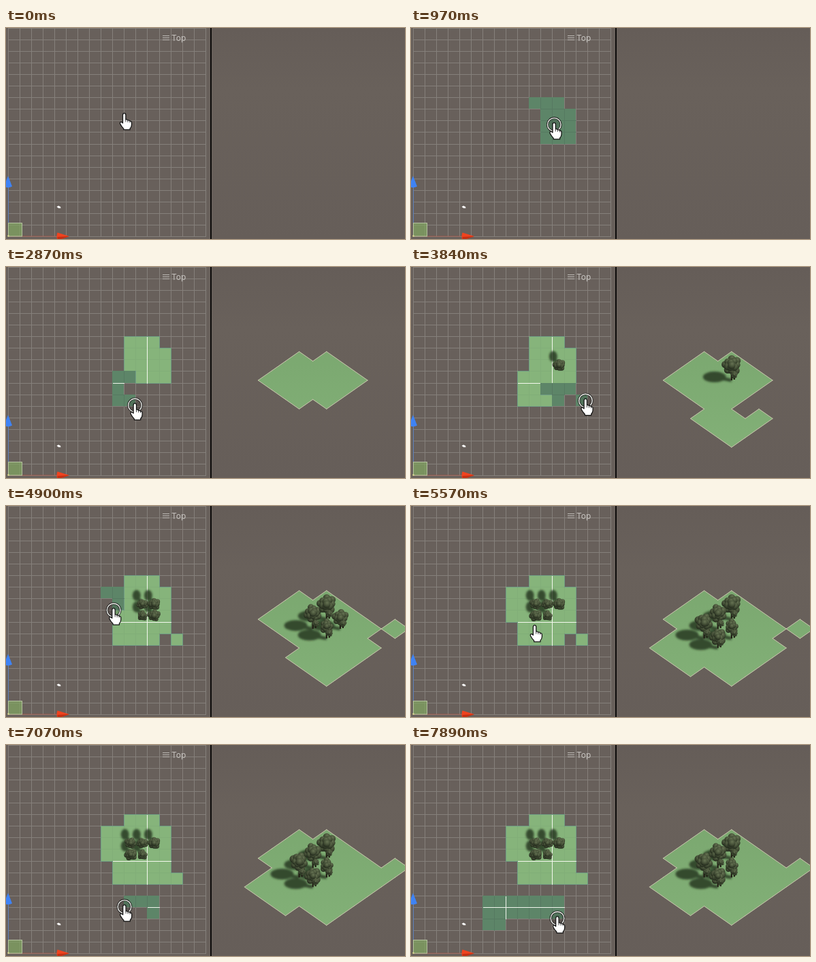
An HTML page for the animation above (8 s loop, 586 by 311 pixels).

```html
<!DOCTYPE html>
<html lang="en">
<head>
<meta charset="utf-8">
<title>Tile painting</title>
<style>
html, body { margin: 0; width: 100%; height: 100%; overflow: hidden; background: #68605b; }
svg { display: block; }
text { font: 12px Inter, Roboto, sans-serif; fill: #c6c2be; }
</style>
</head>
<body>
<svg width="586" height="311" viewBox="0 0 586 311">
  <defs>
    <radialGradient id="leaf" cx=".58" cy=".3" r=".72">
      <stop offset="0" stop-color="#667353"/>
      <stop offset=".5" stop-color="#465138"/>
      <stop offset="1" stop-color="#1f2619"/>
    </radialGradient>
    <linearGradient id="sky" x2="0" y2="1">
      <stop offset="0" stop-color="#655d58"/>
      <stop offset=".3" stop-color="#69615b"/>
      <stop offset="1" stop-color="#665e59"/>
    </linearGradient>
    <linearGradient id="lawn" gradientUnits="userSpaceOnUse" x1="0" y1="120" x2="0" y2="268">
      <stop offset="0" stop-color="#7ba870"/>
      <stop offset="1" stop-color="#82b077"/>
    </linearGradient>
    <filter id="soft" x="-30%" y="-30%" width="160%" height="160%"><feGaussianBlur stdDeviation="1.6"/></filter>
    <clipPath id="right"><path d="M302 0H586V311H302Z"/></clipPath>
  </defs>
  <rect width="586" height="311" fill="#68605b"/>
  <rect x="302" width="284" height="311" fill="url(#sky)"/>
  <path id="grid" stroke="#85807b" fill="none" shape-rendering="crispEdges"/>
  <g id="plan"></g>
  <g id="iso" clip-path="url(#right)"></g>
  <path d="M3.500 235V307" stroke="#4a86e8" opacity=".6"/>
  <path d="M3 307H76" stroke="#c2503c" opacity=".6"/>
  <rect x="3.500" y="287.500" width="20" height="19.500" fill="#81a562" fill-opacity=".72" stroke="#b5c4a0"/>
  <path d="M3 218L9 233.500Q3 237 -3 233.500Z" fill="#3f83f5"/>
  <path d="M75.500 301.500L93 307L75.500 313Q73.500 307 75.500 301.500Z" fill="#f0431f"/>
  <path d="M75.500 308L93 307L75.500 313Z" fill="#c23014"/>
  <path d="M74.500 263.500L77 262L80 263.500L80.500 265.500L77 265.500Z" fill="#fff"/>
  <circle cx="3.500" cy="306.500" r="1.300" fill="#d8d890"/>
  <path d="M230 11.500H240M230 14.500H240M230 17.500H240" stroke="#bdb9b5"/>
  <text x="243" y="19">Top</text>
  <rect x="300" width="2" height="311" fill="#0c0b0a"/>
  <g id="hand">
    <g id="ring">
      <circle r="9.800" fill="#1d1d1d" fill-opacity=".18" stroke="#1a1a1a" stroke-width="3"/>
      <circle r="9.800" fill="none" stroke="#f2f2ee" stroke-width="1.400"/>
    </g>
    <g transform="translate(0 -1.300) scale(1.040)">
      <path d="M-2.200 1Q-2.200 -1.500 0 -1.500Q2 -1.500 2 1V7.500Q3.400 6.800 4.900 8.600Q6.600 7.900 7.800 9.700Q10.300 9.400 10.300 12.300V15Q10 18.500 8 20V22H-1V20.500Q-4 17.500 -6 13.500Q-6.500 10.800 -4.200 11Q-3 11.600 -2.200 12.600Z"
        fill="#fff" stroke="#111" stroke-width="1.200" stroke-linejoin="round"/>
      <path d="M2 7.500V11M4.900 8.600V11.500M7.800 9.700V12" stroke="#222" stroke-width=".8"/>
    </g>
  </g>
</svg>
<script>
const LOOP = 8000, TICK = 135.9, RELEASE = 110, PITCH = 17.064, CHUNK = 4;
const el = id => document.getElementById(id);
const mix = (a, b, f) => a.map((v, i) => v + (b[i] - v) * f);
const easeOut = f => 1 - (1 - f) ** 3;
const rand = (...seed) => {
  const v = Math.sin(seed.reduce((sum, s) => sum * 3.7 + s * 12.9, 1)) * 43758.5;
  return v - Math.floor(v);
};

// Cell coordinates to pixels, in the plan and in the isometric view
const planAt = (c, r) => [3.2 + c * PITCH, 0.4 + r * PITCH];
const snapAt = (c, r) => planAt(c, r).map(Math.floor);
const lineAt = (c, r) => snapAt(c, r).map(v => v + .5);
const isoAt = (c, r) => [370.3 + 20.1 * (c + r - 16), 167 + 14.1 * (r - c + 4)];

// Each stroke walks from cell to cell at a constant pace
const strokes = [
  { from: 270, to: 1138, start: [10.35, 6.32], route: "E E S E S S W W N N SE W W N" },
  { from: 2330, to: 2990, start: [10.02, 9.92], route: "W S S E E NW" },
  { from: 3420, to: 3810, start: [11.84, 10.52], route: "SE N E SE" },
  { from: 4640, to: 5290, start: [8.13, 7.97], route: "E S W S E" },
  { from: 5840, to: 5840, start: [13.5, 11.5], route: "" },
  { from: 6690, to: 7890, start: [12.41, 14.95], route: "N W W W W W W S S E N E E E E E" }
];
const has = (word, ch) => word.includes(ch) ? 1 : 0;
const cells = new Map();
for (const s of strokes) {
  s.nodes = [s.start];
  for (const w of s.route.split(" ").filter(Boolean)) {
    const [c, r] = s.nodes.at(-1);
    s.nodes.push([c + has(w, "E") - has(w, "W"), r + has(w, "S") - has(w, "N")]);
  }
  s.pace = (s.to - s.from) / (s.nodes.length - 1) || 1;
  s.nodes.forEach((node, i) => {
    const [c, r] = node.map(Math.floor), key = c + "," + r;
    if (!cells.has(key)) cells.set(key, { c, r, on: s.from + i * s.pace, set: s.to + RELEASE });
  });
}

function pointer(t) {
  const i = strokes.findLastIndex(s => s.from <= t), s = strokes[i], next = strokes[i + 1];
  const end = s ? s.nodes.at(-1) : [10, 7.5], left = s ? s.to + RELEASE : 0;
  if (s && t < s.to) {
    const n = (t - s.from) / s.pace, k = Math.floor(n);
    return mix(s.nodes[k], s.nodes[k + 1], n - k);
  }
  if (t < left || !next) return end;
  return mix(end, next.start, easeOut((t - left) / (next.from - left)));
}

// Cells that carry a tree after each release
const groves = ["", "12,8", "11,8 12,8 11,9 12,9", "12,8 11,8 10,8 11,9 10,9"];
const treesAt = t => {
  const n = strokes.filter(s => s.to + RELEASE <= t).length;
  const list = n ? groves[Math.min(n, groves.length) - 1] : "";
  return list.split(" ").filter(Boolean).map(k => k.split(",").map(Number));
};

const num = p => p.map(v => v.toFixed(1)).join(" ");
const path = (d, attrs) => d ? `<path d="${d}" ${attrs}/>` : "";

// A crown is a spiral of leaf balls, outermost first
function crown([x, y], r, squash, seed) {
  let out = "";
  for (let i = 13; i >= 0; i--) {
    const a = i * 2.4 + seed * 6.3, d = r * .72 * Math.sqrt(i / 13);
    const p = [x + d * Math.cos(a), y + d * squash * Math.sin(a)];
    out += `<circle transform="translate(${num(p)})" r="${(r * (.36 + .1 * rand(i, seed))).toFixed(1)}" fill="url(#leaf)"/>`;
  }
  return out;
}

function shade(map, [c, r], rx, ry) {
  const foot = map(c + .5, r + .5), [x, y] = map(c + .05, r - .3);
  return `<ellipse cx="${x}" cy="${y}" rx="${rx}" ry="${ry}"/>` +
    path(`M${num(foot)}L${num([x, y])}`, 'stroke="#22331d" stroke-width="5"');
}

const planTree = ([c, r]) => crown(planAt(c + .55, r + .45), 7 + 2 * rand(c, r), .95, rand(c, r));

function isoTree([c, r]) {
  const [x, y] = isoAt(c + .5, r + .5), size = rand(c, r);
  const h = 24 - 6 * (r - 8) - 2 * size;
  return path(`M${x} ${y}v${-h}M${x + 4} ${y - 1}v-8`, 'stroke="#221d15" stroke-width="2.200"') +
    crown([x, y - h], 11.5 + 2 * size - 2 * (r - 8), 1.15, size) +
    crown([x + 4, y - 8], 5, 1, size + .4);
}

function forest(trees, map, rx, ry, tree) {
  return `<g filter="url(#soft)" fill="#22331d" opacity=".8">${trees.map(k => shade(map, k, rx, ry)).join("")}</g>` +
    trees.map(tree).join("");
}

const tile = (map, { c, r }) =>
  "M" + [[c, r], [c + 1, r], [c + 1, r + 1], [c, r + 1]].map(p => num(map(...p))).join("L") + "Z";

// Joins the sides of cells that pass a test of direction and neighbour
function edges(map, list, keep) {
  const taken = new Set(list.map(k => k.c + "," + k.r));
  let d = "";
  for (const { c, r } of list) for (const [dc, dr] of [[0, -1], [1, 0], [0, 1], [-1, 0]]) {
    if (!keep(taken.has((c + dc) + "," + (r + dr)), dc, dr, c, r)) continue;
    const a = [c + (dc > 0), r + (dr > 0)], b = [a[0] + (dc ? 0 : 1), a[1] + (dr ? 0 : 1)];
    d += `M${num(map(...a))}L${num(map(...b))}`;
  }
  return d;
}
const outer = inner => !inner;
const joint = (inner, dc, dr) => inner && dc + dr < 0;
const chunk = span => (inner, dc, dr, c, r) =>
  joint(inner, dc, dr) && (dc ? c % span === 0 : (18 - r) % CHUNK === 0);

function draw(t) {
  const shown = [...cells.values()].filter(k => k.on <= t);
  const done = shown.filter(k => k.set <= t), fresh = shown.filter(k => k.set > t);
  const trees = treesAt(t);
  const all = (map, list) => list.map(k => tile(map, k)).join("");
  const crisp = 'fill="none" shape-rendering="crispEdges" stroke=';

  el("plan").innerHTML =
    path(all(snapAt, done), 'fill="#86b47b"') +
    path(edges(lineAt, done, joint), crisp + '"#769f70" stroke-opacity=".3"') +
    path(edges(lineAt, done, outer), crisp + '"#6f9c84"') +
    path(edges(lineAt, done, chunk(CHUNK)), crisp + '"#f4f8ee"') +
    path(all(snapAt, fresh), 'fill="#5d8568"') +
    path(edges(lineAt, fresh, joint), crisp + '"#547760" stroke-opacity=".8"') +
    path(edges(lineAt, fresh, chunk(CHUNK * 2)), crisp + '"#f0f5ec"') +
    forest(trees, planAt, 6, 8, planTree);

  el("iso").innerHTML =
    path(all(isoAt, done), 'fill="url(#lawn)" stroke="url(#lawn)" stroke-width=".6"') +
    path(edges(isoAt, done, outer), 'fill="none" stroke="#c8c2ac" stroke-linecap="round"') +
    forest(trees, isoAt, 17, 8, isoTree);

  el("hand").setAttribute("transform", `translate(${num(planAt(...pointer(t)))})`);
  el("ring").style.display = strokes.some(s => t >= s.from && t < s.to + RELEASE) ? "" : "none";
}

let grid = "";
for (let i = 0; i < 18; i++) grid += `M${lineAt(i, 0)[0]} 0V308`;
for (let j = 0; j < 19; j++) grid += `M3 ${lineAt(0, j)[1]}H294`;
el("grid").setAttribute("d", grid);

// The picture advances in even steps after a short opening hold
const step = t => t < 142 ? 0 : 150 + TICK * Math.floor((t - 142) / TICK);

let last = -1;
const start = performance.now();
function tick() {
  const t = step((performance.now() - start) % LOOP);
  if (t !== last) draw(last = t);
  requestAnimationFrame(tick);
}
tick();
</script>
</body>
</html>
```
